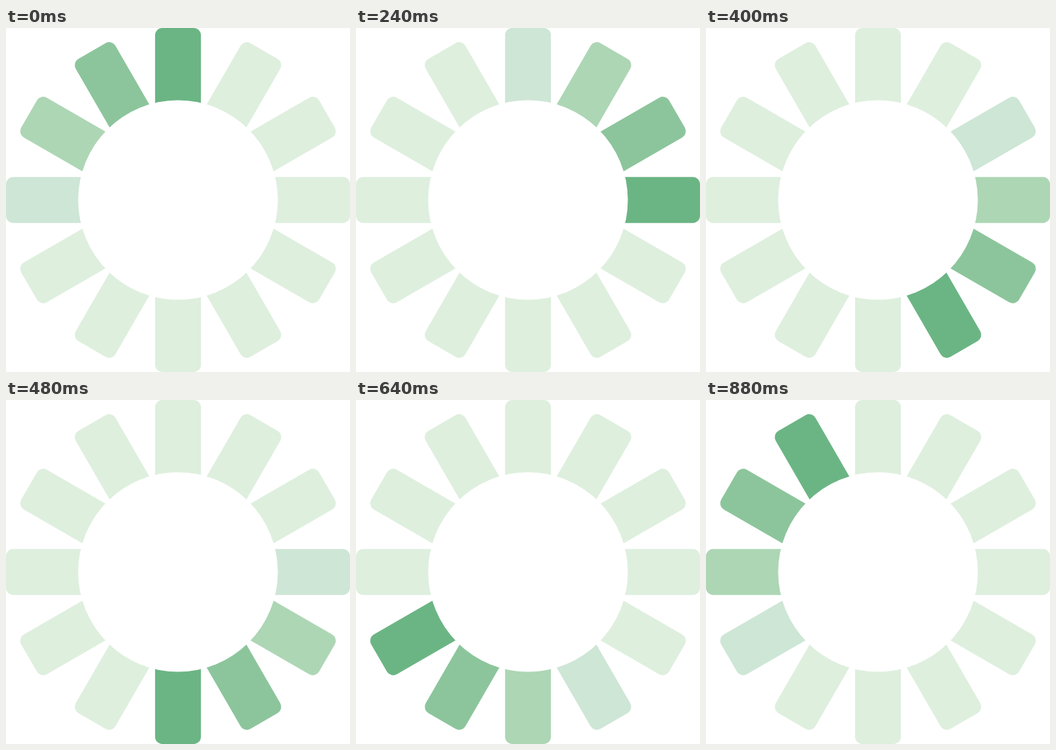
Write an HTML page that moves like this. It is 512 px wide and 512 px high and loops after 960 ms.

```html
<!DOCTYPE html>
<html>
<head>
<meta charset="utf-8">
<style>
html, body { margin: 0; height: 100%; overflow: hidden; background: #fff; }
svg { display: block; width: 100vw; height: 100vh; }
</style>
</head>
<body>
<svg viewBox="-256 -256 512 512"></svg>
<script>
const COUNT = 12, STEP = 80;
const TRAIL = ['#6bb584', '#8cc59c', '#add6b5', '#cee6d6'];
const IDLE = '#deefde';
const svg = document.querySelector('svg');

function add(name, attrs) {
  const el = document.createElementNS('http://www.w3.org/2000/svg', name);
  for (const key in attrs) el.setAttribute(key, attrs[key]);
  return svg.appendChild(el);
}

const bars = Array.from({ length: COUNT }, (_, i) => add('rect', {
  x: -34.13, y: -256, width: 68.27, height: 130, rx: 10.7,
  transform: `rotate(${i * 360 / COUNT})`
}));
add('circle', { r: 148.6, fill: '#fff' });

function draw() {
  const head = Math.floor(performance.now() / STEP) % COUNT;
  bars.forEach((bar, i) => {
    bar.setAttribute('fill', TRAIL[(head - i + COUNT) % COUNT] || IDLE);
  });
  requestAnimationFrame(draw);
}
draw();
</script>
</body>
</html>
```
